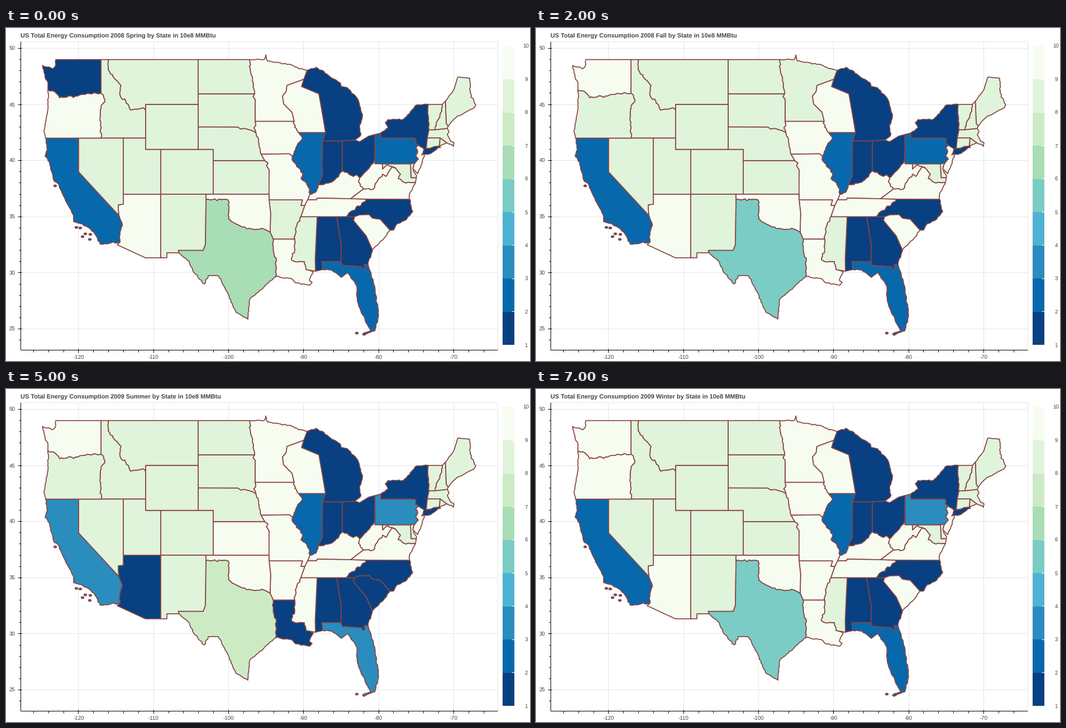
These frames come from a looping animation (938x597 px, 8000 ms). A matplotlib script:

```python
from itertools import combinations

import numpy as np
import matplotlib.pyplot as plt
from matplotlib.animation import FuncAnimation
from matplotlib.patches import PathPatch, Rectangle
from matplotlib.path import Path

W, H, DPI = 938, 597, 100
PX = 72 / DPI
PALETTE = ["#084081", "#0868ac", "#2b8cbe", "#4eb3d3", "#7bccc4",
           "#a8ddb5", "#ccebc5", "#e0f3db", "#f7fcf0"]
INK, GRID = "#444444", "#e5e5e5"

plt.rcParams["font.family"] = "Liberation Sans"
plt.rcParams["text.hinting"] = "none"
fig = plt.figure(figsize=(W / DPI, H / DPI), dpi=DPI, facecolor="white")
ax = fig.add_axes([0, 0, 1, 1])
ax.set_xlim(0, W)
ax.set_ylim(H, 0)
ax.axis("off")

# The map is a graph: corners where regions meet, joined by straight borders
# unless a bend is given. SEA and CAN are the regions outside.
corners, bends = [], {}
rng = np.random.default_rng(4)


def meet(regions, x, y):
    corners.append((regions.split(), np.array([x, y], float)))


def bend(pair, *xy, rough=0):
    bends[frozenset(pair.split())] = np.reshape(xy, (-1, 2)), rough


def river(pair, *xy):
    bend(pair, *xy, rough=.8)


def coast(pair, *xy):
    bend(pair, *xy, rough=.6)


# Pacific and mountains
meet("CAN SEA WA", 89, 56.6)
meet("CAN WA ID", 170, 56.6)
meet("CAN ID MT", 183, 56.6)
meet("CAN MT ND", 344, 56.6)
meet("WA ID OR", 170, 117)
meet("SEA WA OR", 75, 111)
meet("SEA OR CA", 71, 197.4)
meet("OR CA NV", 130, 197.4)
meet("OR ID NV", 170, 197.4)
meet("ID NV UT", 210, 197.4)
meet("CA NV AZ", 202, 336)
meet("NV UT AZ", 210, 298)
meet("SEA CA AZ", 204, 384)
meet("SEA AZ NM", 277, 412)
meet("UT CO AZ NM", 277, 298)
meet("ID MT WY", 250, 148)
meet("ID UT WY", 250, 197.4)
meet("UT WY CO", 277, 217.6)
meet("MT ND SD", 344, 118.2)
meet("MT SD WY", 344, 137.1)
meet("WY SD NE", 344, 177.3)
meet("WY NE CO", 344, 217.6)
meet("NE CO KS", 371, 237.7)
meet("CO KS OK", 371, 298)
meet("CO NM OK", 358, 298)
meet("NM OK TX", 358, 308.1)
meet("SEA NM TX", 310, 403)
coast("SEA WA", 75, 98, 71, 92, 65.5, 67, 84, 73, 88, 69)
river("WA OR", 87, 114, 96, 125, 124, 122, 141, 119, 146, 117)
river("OR ID", 177, 129, 169, 146)
coast("SEA OR", 76, 125, 74, 152, 68, 184)
bend("CA NV", 130, 258)
coast("SEA CA", 74, 218, 70, 230, 78, 241, 85, 272, 95, 282, 104, 303, 121, 337,
      121, 347, 136, 351, 148, 358, 157, 366, 168.5, 387.5)
river("CA AZ", 208, 352, 204, 366)
bend("NV AZ", 201, 325, 201, 317, 210, 316)
bend("SEA AZ", 199, 388.5, 249.5, 412)
bend("UT WY", 250, 217.6)
river("ID MT", 183, 75, 206, 103, 204, 120, 219, 137, 223, 147, 245, 143)
bend("MT WY", 250, 137.1)
bend("CO NE", 371, 217.6)
bend("NM TX", 357, 388, 353, 398.7, 308.5, 398.7)
bend("SEA NM", 288, 412, 288, 403)

# Plains
meet("CAN ND MN", 436, 56.6)
meet("ND SD MN", 445, 118.2)
meet("SD MN IA", 445.8, 167.3)
meet("SD NE IA", 447, 187.4)
meet("NE IA MO", 456.5, 226.3)
meet("NE KS MO", 463, 237.7)
meet("KS MO OK", 470.8, 298)
meet("MO OK AR", 471, 308.1)
meet("OK AR TX", 472.8, 366)
meet("AR TX LA", 478.4, 378.5)
meet("SEA TX LA", 482.5, 446)
river("ND MN", 437, 72, 442, 97)
bend("SD MN", 442, 123, 446, 128)
river("SD IA", 447, 175, 443.5, 179)
bend("SD NE", 415, 177.5, 420, 181, 427, 180, 441, 184)
river("NE IA", 453, 209)
bend("KS MO", 469, 242, 466.5, 247, 471, 254)
bend("OK AR", 473.7, 332)
river("OK TX", 397.5, 308.1, 398.5, 342, 411, 351, 431, 360, 463, 361)
river("LA TX", 478.5, 400, 484, 417)
coast("SEA TX", 328, 419, 336, 438, 355, 459, 362, 444, 380, 444, 396, 473,
      411, 509, 433, 522, 436, 487)

# Upper Mississippi and lakes
meet("CAN MN MI", 539, 76)
meet("MN WI MI", 533, 92)
meet("MN IA WI", 516, 167.3)
meet("IA WI IL", 524, 187.4)
meet("IA IL MO", 513.3, 230)
meet("IL MO KY", 544, 298)
meet("WI IL MI", 572, 187.4)
meet("IL IN MI", 566.5, 202.3)
meet("IL IN KY", 558.6, 282)
meet("MI IN OH", 602, 202.3)
meet("IN OH KY", 602, 256)
meet("CAN MI OH", 625, 201)
meet("CAN OH PA", 660.5, 191)
meet("OH PA WV", 660.5, 225)
meet("OH KY WV", 633.5, 268.5)
coast("CAN MN", 462, 56.6, 465, 48.5, 468, 59, 488, 62, 511, 66, 524, 73)
bend("MN WI", 503, 103, 501.5, 114, 495, 122, 497, 136, 512, 151)
river("IA WI", 517, 178)
river("IA IL", 531, 197, 521, 211)
bend("IA MO", 507, 225.5)
river("IL MO", 512, 236, 524, 251, 531, 260, 528, 270, 538, 278)
bend("WI MI", 529, 105, 560, 118, 565, 146)
bend("IL IN", 566, 256, 567, 264)
river("IL KY", 555, 294)
river("IN KY", 595, 267, 586, 274, 565, 281)
coast("CAN MI", 555, 70.5, 598, 98, 600, 105, 611, 107, 630, 128, 638, 159,
      633, 174, 634, 194)
bend("CAN OH", 633, 204, 649, 194)
river("OH WV", 658, 242, 642, 259)
river("OH KY", 614, 262, 622, 266, 628, 263)

# South
meet("KY WV VA", 640, 288.5)
meet("KY VA TN", 617, 306)
meet("KY TN MO", 540, 308)
meet("MO AR TN", 535, 318)
meet("AR TN MS", 528, 338.3)
meet("AR LA MS", 517, 378.5)
meet("SEA LA MS", 537, 433)
meet("TN MS AL", 557, 338.3)
meet("SEA MS AL", 554, 436)
meet("TN AL GA", 592, 338.3)
meet("TN GA NC", 608.7, 338.3)
meet("TN NC VA", 644.5, 306.8)
meet("NC GA SC", 624, 338.3)
meet("AL GA FL", 599.7, 418.8)
meet("SEA AL FL", 567, 433)
meet("SEA GA FL", 648, 424)
meet("SEA GA SC", 656, 398)
meet("SEA NC SC", 687, 362)
meet("SEA NC VA", 722.5, 307)
river("KY WV", 631, 276)
bend("KY TN", 557, 305, 556, 308)
bend("MO AR", 531, 308.1, 528, 318)
river("AR MS", 520, 356)
river("LA MS", 517, 398, 511, 413, 517, 418.8, 534, 418.8)
coast("SEA LA", 510, 449, 519, 457, 544, 461, 548, 456, 543, 452, 550, 437)
bend("MS AL", 553.5, 415)
river("TN NC", 617, 329, 636, 317)
bend("NC SC", 633, 335, 650, 334.5, 656, 341, 670, 343)
bend("GA SC", 622, 345, 645, 373)
bend("AL GA", 600, 388)
bend("AL FL", 565.5, 418.8)
bend("GA FL", 602, 425.5, 637, 428, 638, 432, 642, 431.5, 641, 424)
coast("SEA SC", 679, 374)
coast("SEA NC", 694, 362, 700, 351, 714, 345, 728, 329)
coast("SEA GA", 650, 414)
coast("SEA FL", 583, 434, 600, 447, 612, 438.5, 628, 463, 629, 490, 638, 514, 653, 543,
      638, 549, 641, 551, 660, 543, 667, 515, 660, 463)

# Atlantic and New England
meet("MD VA WV", 697, 251)
meet("MD PA WV", 673.5, 243.5)
meet("MD PA DE", 724, 243.5)
meet("SEA MD VA", 733, 277)
meet("SEA MD DE", 734.5, 268.5)
meet("SEA PA DE NJ", 732, 242)
meet("PA NY NJ", 738, 210)
meet("CAN PA NY", 670.5, 188.5)
meet("CAN NY VT", 756, 137)
meet("NY VT MA", 757, 182.4)
meet("NY MA CT", 754, 197)
meet("SEA NY CT", 752, 217)
meet("SEA NY NJ", 746.5, 224)
meet("MA CT RI", 777, 197)
meet("SEA CT RI", 776, 211.5)
meet("SEA MA RI", 789, 206)
meet("VT NH MA", 768, 182.4)
meet("CAN VT NH", 781, 137)
meet("CAN NH ME", 786.5, 131)
meet("SEA NH ME", 791.5, 176)
meet("SEA NH MA", 790, 180)
meet("CAN SEA ME", 841, 138)
coast("SEA VA", 722, 299)
river("MD VA", 706, 262, 702, 270, 716, 278)
river("VA WV", 691, 249, 680, 266, 674, 262, 661, 279, 657, 289)
river("MD WV", 674, 253, 683, 245)
bend("WV PA", 660.5, 243.5)
bend("MD DE", 725, 268.5)
coast("SEA DE", 729, 248)
river("PA NJ", 738, 235, 733, 229, 737, 222, 733, 216)
bend("PA NY", 733, 206, 734, 200, 731, 197.4, 671, 197.4)
coast("CAN NY", 684, 179, 679, 170, 684, 164, 711, 164, 735, 138)
river("NY VT", 755, 152)
coast("SEA NY", 775, 211.5, 778, 214, 757, 226, 744, 227.5)
bend("NY NJ", 748.5, 216.5)
coast("SEA NJ", 749, 230, 737, 261, 728, 252)
coast("SEA MA", 793, 186, 790, 191, 796, 203, 802, 206, 801, 212)
river("VT NH", 780, 149, 770, 171)
bend("NH ME", 788, 171)
coast("CAN ME", 801, 112, 809, 88, 830, 90, 831, 116)
coast("SEA ME", 838, 143, 805, 161)

ISLANDS = {"CA": [(88, 283), (126, 357.5), (133, 358.5), (137, 374), (142, 369),
                  (151, 370), (150, 379)],
           "FL": [(628, 547)]}

BASE = {0: "MI IN OH AL GA NC NY", 1: "CA IL FL PA", 4: "TX",
        8: "WA OR AZ OK MN IA MO AR LA WI KY TN SC VA WV NJ"}
QUARTERS = [
    ("2008 Spring", "WA0 AR7 TX5"),
    ("2008 Summer", "WA0 OR7 CA2 CO8 KS8 AZ0 TX6 MS8 LA0 IL2 OH1 AL1 GA1 SC0 FL2 PA2 MD8"),
    ("2008 Fall", "OR7 MN7"),
    ("2008 Winter", "TX5 PA2"),
    ("2009 Spring", "OR7 MN7 IA7 MI8 NC8 AR7"),
    ("2009 Summer", "OR7 CA2 AZ0 KS8 MS8 LA0 TX6 SC0 FL2 PA2"),
    ("2009 Fall", "OR7 MN7"),
    ("2009 Winter", "PA2"),
]


def length(pts):
    return np.hypot(*np.diff(pts, axis=0).T).sum()


def roughen(pts, amount):
    """Break each segment into short steps and scatter the new points."""
    out = [pts[:1]]
    for a, b in zip(pts, pts[1:]):
        n = max(1, round(np.hypot(*(b - a)) / 4))
        steps = a + (b - a) * np.linspace(0, 1, n + 1)[1:, None]
        steps[:-1] += rng.normal(0, amount, (n - 1, 2))
        out.append(steps)
    return np.vstack(out)


def border(pair):
    """Join the two corners both regions share, or None."""
    ends = [p for names, p in corners if set(pair) <= set(names)]
    if len(ends) != 2:
        return None
    mid, rough = bends.get(frozenset(pair), (np.empty((0, 2)), 0))
    ways = [np.vstack([a, mid, b]) for a, b in (ends, ends[::-1])]
    pts = min(ways, key=length)
    return roughen(pts, rough) if rough else pts


def outline(state):
    """Chain the state's borders end to end into one ring."""
    parts = [pts for pair, pts in borders.items() if state in pair]
    ring = parts.pop(0)
    while parts:
        gaps = [(np.hypot(*(p[end] - ring[-1])), i, end)
                for i, p in enumerate(parts) for end in (0, -1)]
        _, i, end = min(gaps)
        nxt = parts.pop(i)
        ring = np.vstack([ring, nxt if end == 0 else nxt[::-1]])
    return Path(np.vstack([ring, ring[:1]]), closed=True)


def island(x, y):
    t = np.linspace(0, 2 * np.pi, 13)
    return Path(np.column_stack([x + 2.4 * np.cos(t), y + 1.6 * np.sin(t)]), closed=True)


def lon_x(lon):
    return 129.9 + (lon + 120) * 13.43


def lat_y(lat):
    return 36.5 + (50 - lat) * 20.12


def line(x0, y0, x1, y1, color="black", z=3):
    # Half a pixel back, so that snapping picks the pixel under the line.
    ax.plot([x0 - .5, x1 - .5], [y0 - .5, y1 - .5], color=color, lw=PX,
            zorder=z, solid_capstyle="butt")


def label(x, y, text, ha="center"):
    ax.text(x, y, text, size=9.8 * PX, color=INK, ha=ha, va="center_baseline")


# Plot frame, grid and ticks
LEFT, TOP, RIGHT, BOTTOM = 26.5, 24.5, 880.5, 577.5
line(LEFT, TOP, RIGHT, TOP, GRID, 0)
line(RIGHT, TOP, RIGHT, BOTTOM, GRID, 0)
line(LEFT, TOP, LEFT, BOTTOM)
line(LEFT, BOTTOM, RIGHT, BOTTOM)
for lon in range(-126, -65, 2):
    x, major = lon_x(lon), lon % 10 == 0
    line(x, BOTTOM - 2 * major, x, BOTTOM + (5 if major else 3.5))
    if major:
        line(x, TOP, x, BOTTOM, GRID, 0)
        label(x, 590, str(lon))
for lat in range(24, 51):
    y, major = lat_y(lat), lat % 5 == 0
    line(LEFT - (5 if major else 3.5), y, LEFT + 2 * major, y)
    if major:
        line(LEFT, y, RIGHT, y, GRID, 0)
        label(16.5, y, str(lat), "right")

# Colour scale
FOOT, STEP = 568.4, 59.55
for k, color in enumerate(PALETTE):
    ax.add_patch(Rectangle((889, FOOT - (k + 1) * STEP), 21, STEP, fc=color, lw=0))
for k in range(10):
    y = FOOT - k * STEP
    line(905.5, y, 910.5, y, "white")
    label(931, y, str(k + 1))

regions = sorted({r for names, _ in corners for r in names})
borders = {pair: border(pair) for pair in combinations(regions, 2)}
borders = {pair: pts for pair, pts in borders.items() if pts is not None}

states = {}
for name in regions:
    if name in ("SEA", "CAN"):
        continue
    shape = [outline(name)] + [island(*p) for p in ISLANDS.get(name, [])]
    states[name] = ax.add_patch(PathPatch(
        Path.make_compound_path(*shape), ec="#884444", lw=1.7 * PX,
        joinstyle="round", snap=False, zorder=2))

title = ax.text(26, 18, "", size=11 * PX, weight="bold", color=INK)


def update(i):
    quarter, changes = QUARTERS[i]
    level = dict.fromkeys(states, 7)
    for value, names in BASE.items():
        level.update(dict.fromkeys(names.split(), value))
    level.update((c[:2], int(c[2])) for c in changes.split())
    for name, patch in states.items():
        patch.set_facecolor(PALETTE[level[name]])
    title.set_text(f"US Total Energy Consumption {quarter} by State in 10e8 MMBtu")
    return [title, *states.values()]


anim = FuncAnimation(fig, update, frames=len(QUARTERS), interval=1000,
                     repeat=True, repeat_delay=0)
plt.show()
```
